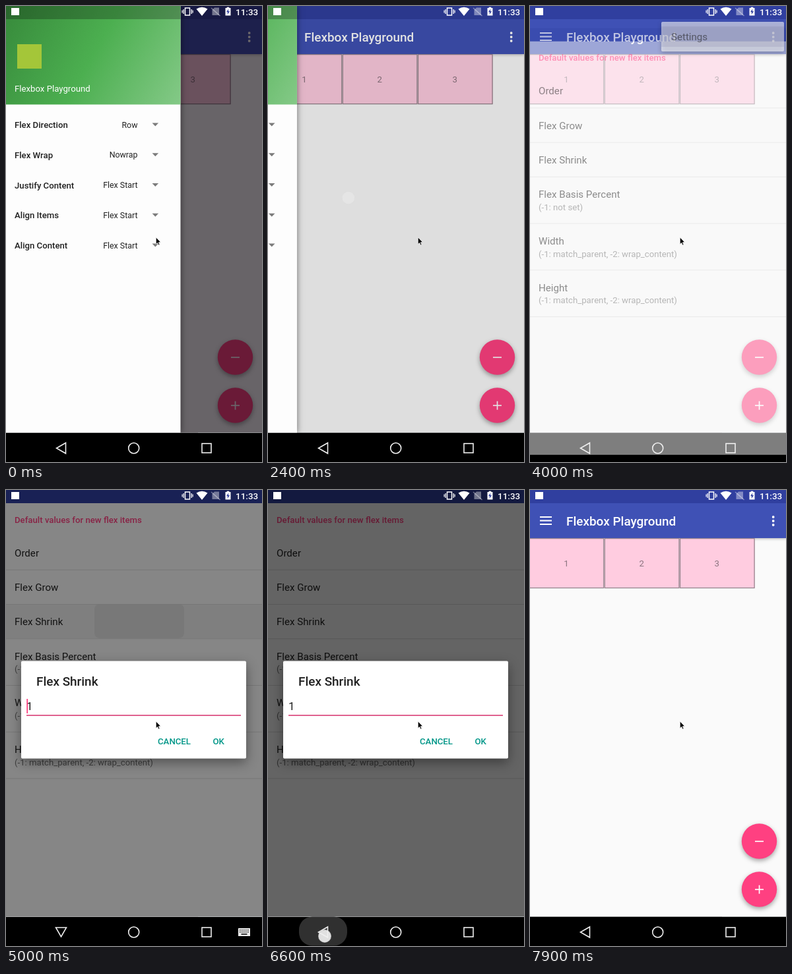
Write an HTML page with a canvas that moves like this. It is 388x692 px and loops after 8 s.

```html
<!DOCTYPE html>
<html lang="en">
<head>
<meta charset="utf-8">
<title>Flexbox Playground</title>
<style>
html, body { margin: 0; width: 100%; height: 100%; overflow: hidden; background: #000; }
canvas { display: block; width: 388px; height: 692px; }
</style>
</head>
<body>
<canvas id="stage"></canvas>
<script>
const W = 388, H = 692, LOOP = 8000, NAV = 647.5, DRAWER = 264.5;
const PINK = '#ff4081', TEAL = '#009688', INK = '#212121', PAPER = '#fafafa';
const canvas = document.getElementById('stage');
const c = canvas.getContext('2d');
const dpr = window.devicePixelRatio || 1;
canvas.width = W * dpr;
canvas.height = H * dpr;

// Eased 0 to 1, starting at the given time
function ramp(t, start, span) {
  const p = Math.min(1, Math.max(0, (t - start) / span));
  return p * p * (3 - 2 * p);
}

// Rises at one time and falls at another
const pulse = (t, on, off, span) => ramp(t, on, span) - ramp(t, off, span);

function rect(x, y, w, h, fill) {
  c.fillStyle = fill;
  c.fillRect(x, y, w, h);
}

function round(x, y, w, h, r, fill) {
  c.fillStyle = fill;
  c.beginPath();
  c.roundRect(x, y, w, h, r);
  c.fill();
}

function disc(x, y, r, fill) {
  c.fillStyle = fill;
  c.beginPath();
  c.arc(x, y, r, 0, 7);
  c.fill();
}

function text(s, x, y, size, fill, weight = 400, align = 'left') {
  c.font = `${weight} ${size}px Roboto, sans-serif`;
  c.textAlign = align;
  c.fillStyle = fill;
  c.fillText(s, x, y);
}

// Isosceles triangle around x, y: half its base, half its height, turned
function triangle(x, y, base, height, turn = 0) {
  c.save();
  c.translate(x, y);
  c.rotate(turn);
  c.beginPath();
  c.moveTo(-base, -height);
  c.lineTo(base, -height);
  c.lineTo(0, height);
  c.closePath();
  c.restore();
}

function layer(alpha, draw, dx = 0, dy = 0) {
  if (alpha <= 0) return;
  c.save();
  c.globalAlpha *= alpha;
  c.translate(dx, dy);
  draw();
  c.restore();
}

function zoom(x, y, s) {
  c.translate(x, y);
  c.scale(s, s);
  c.translate(-x, -y);
}

function shadow(blur, dy, alpha, draw) {
  c.save();
  c.shadowColor = `rgba(0,0,0,${alpha})`;
  c.shadowBlur = blur * dpr;
  c.shadowOffsetY = dy * dpr;
  draw();
  c.restore();
}

const card = (x, y, w, h, blur) =>
  shadow(blur, blur / 3, .4, () => round(x, y, w, h, 2, '#fff'));

function mainPage() {
  rect(0, 0, W, NAV, PAPER);
  shadow(4, 1, .3, () => rect(0, 20, W, 53, '#3f51b5'));
  rect(0, 0, W, 20, '#303f9f');
  text('Flexbox Playground', 55, 53.5, 18.95, '#fff', 500);
  for (let i = 0; i < 3; i++) {
    rect(15, 40 + i * 5.5, 18, 2, '#fff');
    disc(368.7, 41 + i * 6, 1.9, '#fff');
    const x = -1.5 + i * 114.2;
    rect(x, 73, 113.8, 76, '#ffcce0');
    c.strokeStyle = '#97858e';
    c.lineWidth = 1.3;
    c.strokeRect(x + .6, 73.6, 112.6, 75);
    text(i + 1, x + 56.4, 115.9, 13.2, '#8a737e', 400, 'center');
  }
  for (const y of [533, 606]) {
    shadow(7, 3, .35, () => disc(347.5, y, 26.7, PINK));
    rect(341, y - .6, 13, 1.7, '#fff');
  }
  rect(346.7, 599.7, 1.7, 13, '#fff');
}

function drawer(pull, t) {
  if (pull >= 1) return;
  rect(0, 0, W, NAV, `rgba(8,0,8,${.6 * (1 - pull) + .1 * pull * (1 - pull)})`);
  const x = -DRAWER * pull;
  layer(1, () => {
    shadow(9, 0, .5, () => rect(0, 0, DRAWER, NAV, '#fdfdfd'));
    const g = c.createLinearGradient(DRAWER, 149, 0, 0);
    ['#84c987', '#4caf50', '#378a3b'].forEach((tone, i) => g.addColorStop(i / 2, tone));
    rect(0, 0, DRAWER, 149.5, g);
    rect(17, 58, 37, 37, '#a4c639');
    text('Flexbox Playground', 13, 130, 13.2, '#fff');
    ['Flex Direction', 'Flex Wrap', 'Justify Content', 'Align Items', 'Align Content'].forEach((name, i) => {
      const y = 180 + i * 45.75;
      text(name, 13, y + 5, 13.2, INK, 500);
      text(['Row', 'Nowrap'][i] || 'Flex Start', 199.5, y + 4.7, 12.4, INK, 400, 'right');
      triangle(226.3, y, 4.8, 2.4);
      c.fillStyle = '#7b7b7b';
      c.fill();
    });
    layer(pulse(t, 500, 1500, 150), () => {
      card(103, 203, 112, 119, 8);
      ['Nowrap', 'Wrap', 'Wrap Reverse'].forEach((s, i) => text(s, 116, 230.5 + i * 38, 12.4, INK));
    });
  }, x);
  rect(0, 0, DRAWER + x, 20, 'rgba(0,0,0,.25)');
}

function settingsPage(t) {
  rect(0, 20, W, NAV - 20, PAPER);
  rect(0, 0, W, 20, 'rgba(48,63,159,.6)');
  layer(pulse(t, 4700, 5050, 150), () => {
    rect(0, 173, W, 52, 'rgba(0,0,0,.05)');
    const r = 10 + 58 * ramp(t, 4700, 300);
    round(202 - r, 173, 2 * r, 52, 8, 'rgba(0,0,0,.05)');
  });
  text('Default values for new flex items', 13, 49.7, 13.2, PINK, 500);
  const size = '(-1: match_parent, -2: wrap_content)';
  const hints = { 'Flex Basis Percent': '(-1: not set)', Width: size, Height: size };
  let y = 95;
  for (const name of ['Order', 'Flex Grow', 'Flex Shrink', ...Object.keys(hints)]) {
    const extra = hints[name] ? 18.4 : 0;
    text(name, 13, y + 5.7, 15.1, INK);
    text(hints[name] || '', 13, y + 24.3, 13.2, '#757575');
    rect(0, y + 25.7 + extra, W, 1, '#dcdcdc');
    y += 52.3 + extra;
  }
}

function menu(t) {
  layer(pulse(t, 3150, 3920, 180), () => {
    zoom(385, 24, .5 + .5 * ramp(t, 3150, 180));
    card(199, 24, 186, 45, 7);
    rect(199, 31, 186, 31, `rgba(70,75,120,${.2 * ramp(t, 3700, 150)})`);
    text('Settings', 214, 52.2, 15.1, INK);
  });
}

function dialog(t, typing) {
  rect(0, 0, W, NAV, `rgba(0,0,0,${.6 * pulse(t, 4800, 6700, 290)})`);
  layer(pulse(t, 4800, 6700, 150), () => {
    zoom(194, 333, .9 + .1 * ramp(t, 4800, 160));
    card(23, 259.5, 341, 148, 18);
    text('Flex Shrink', 46, 296.7, 18.95, INK, 500);
    text('1', 31, 334.3, 17, INK);
    rect(31, 341, 325, 2, '#e0628f');
    if ((t - 4850) % 1000 < 500) rect(31.3, 317, 1.8, 22, PINK);
    text('CANCEL', 230, 386, 13.2, TEAL, 500);
    text('OK', 313.5, 386, 13.2, TEAL, 500);
  }, 0, -110 * typing);
}

function keyboard(typing) {
  c.save();
  c.beginPath();
  c.rect(0, 0, W, NAV);
  c.clip();
  c.translate(0, NAV - 216 * typing);
  rect(0, 0, W, 216, '#eceff1');
  rect(291, 0, 97, 216, '#dde2e5');
  [...'123-456.789  0 '].forEach((s, i) =>
    text(s, 48 + i % 4 * 97, 35 + Math.floor(i / 4) * 54, 22, '#37474f', 400, 'center'));
  disc(340, 189, 19, TEAL);
  c.restore();
}

function statusIcons() {
  rect(8, 3, 12, 11, '#fff');
  c.strokeStyle = '#fff';
  c.lineWidth = 1.5;
  c.strokeRect(271.5, 3, 7, 11);
  for (const d of [-1, 1]) {
    rect(274.5 + d * 6, 5, 1.3, 7, '#fff');
    rect(274.5 + d * 8, 6.5, 1.2, 4, '#fff');
  }
  c.fillStyle = '#fff';
  c.fill(new Path2D('M297 15L288.5 4.5Q297 -1 305.5 4.5Z'));
  layer(.4, () => {
    c.fill(new Path2D('M312.5 14V6L316 2.5H323V14Z'));
    c.stroke(new Path2D('M311 3L324.5 15'));
  });
  rect(332.5, 3, 8, 11.5, '#fff');
  rect(334.7, 1.7, 3.6, 2, '#fff');
  c.fillStyle = '#303f9f';
  c.fill(new Path2D('M337.3 4.5L334 9.3H336L335.7 13L339 8H337Z'));
  text('11:33', 348, 13.6, 13.5, '#fff', 500);
}

function navIcons(open) {
  c.strokeStyle = '#eee';
  c.lineWidth = 1.6;
  triangle(83.5, 671, 8, 7, open ? 0 : Math.PI / 2);
  c.stroke();
  c.beginPath();
  c.arc(193.7, 671, 8, 0, 7);
  c.stroke();
  c.strokeRect(297, 664, 14, 14);
  if (!open) return;
  rect(352, 665, 18, 12, '#eee');
  for (let i = 0; i < 10; i++) rect(354 + i % 5 * 3, 667 + Math.floor(i / 5) * 3, 1.5, 1.5, '#000');
  rect(356.5, 673.3, 9, 1.5, '#000');
}

function touch(t, start, x, y, hold = 100) {
  layer(.75 * pulse(t, start, start + hold, 90), () => {
    disc(x, y, 10, '#ddd');
    disc(x, y, 9.3, '#f4f4f4');
  });
}

// Three presses of the back key, evenly spaced
const backPresses = [0, 1, 2].map(i => 5800 + i * 690);

function render(t) {
  const pull = ramp(t, 2060, 460);
  const typing = pulse(t, 5050, 5950, 150);
  c.setTransform(dpr, 0, 0, dpr, 0, 0);
  rect(0, 0, W, H, '#000');
  mainPage();
  drawer(pull, t);

  const fade = ramp(t, 3880, 240) - ramp(t, 7430, 220);
  const slide = 55 * (1 - pulse(t, 3850, 7430, 355));
  layer(fade, () => settingsPage(t), 0, slide);
  menu(t);
  dialog(t, typing);
  keyboard(typing);

  statusIcons();
  for (const s of backPresses) {
    layer(pulse(t, s, s + 220, 110), () => {
      const r = 12 + 24.5 * ramp(t, s, 110);
      round(83.5 - r, NAV, 2 * r, 44, 20, '#303030');
    });
  }
  navIcons(t > 4960 && t < 6000);

  touch(t, 350, 185, 226);
  touch(t, 1380, 150, 226);
  touch(t, 2000, 342 - 264 * pull, 291, 350);
  touch(t, 3000, 368, 47);
  touch(t, 3680, 300, 47);
  touch(t, 4700, 202, 199);
  for (const s of backPresses) touch(t, s, 86, 677);

  const cursor = new Path2D('M227.3 351V361.5L229.7 359.4L231.3 363L233 362.2L231.4 358.8L234.5 358.5Z');
  c.lineWidth = .7;
  c.strokeStyle = '#fff';
  c.fillStyle = '#000';
  c.fill(cursor);
  c.stroke(cursor);
}

function loop(now) {
  render(now % LOOP);
  requestAnimationFrame(loop);
}
requestAnimationFrame(loop);
</script>
</body>
</html>
```
